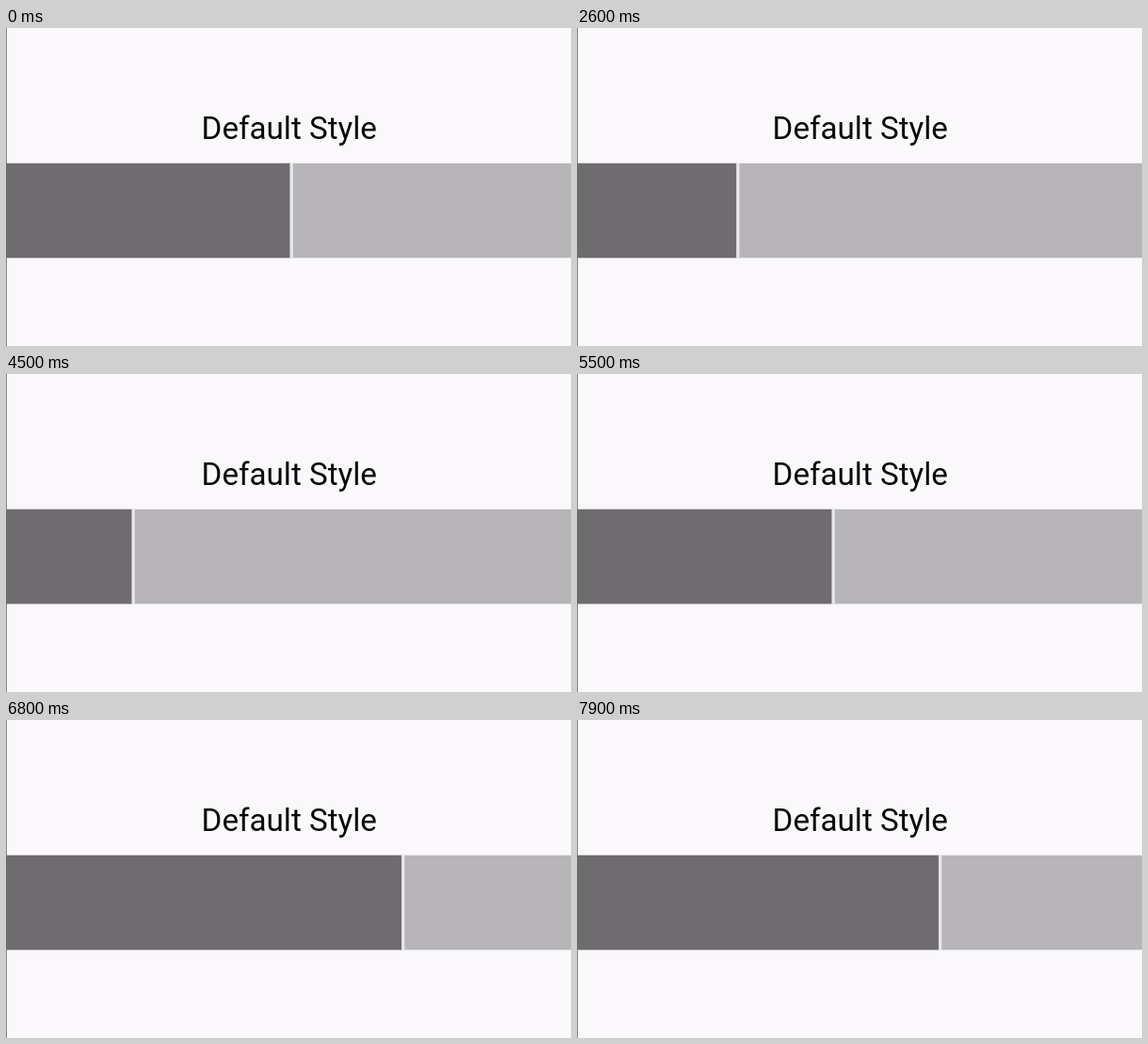
An HTML page for the animation above (8000 ms loop, 600x338 px).

```html
<!DOCTYPE html>
<html lang="en">
<head>
<meta charset="utf-8">
<title>Default Style</title>
<style>
  html, body { margin: 0; width: 100%; height: 100%; overflow: hidden; background: #faf8fb; }
  svg { display: block; width: 100vw; height: 100vh; }
  text { font: 33.2px Roboto, sans-serif; fill: #0a090b; }
  .bar { filter: blur(0.4px); }
</style>
</head>
<body>
<svg viewBox="0 0 600 338">
  <text x="300.8" y="118.2" text-anchor="middle">Default Style</text>
  <rect width="1" height="338" fill="#858386"/>
  <g class="bar">
    <rect x="-10" y="143.8" width="620" height="100.5" fill="#b7b5b8"/>
    <rect id="pane" x="-10" y="143.8" height="100.5" fill="#6e6c6f"/>
    <rect id="divider" y="143.8" width="3.2" height="100.5" fill="#e8e6e9"/>
  </g>
</svg>
<script>
  const LOOP = 8000, STEP = 100;

  // Key points of the drag: [ms, x of the divider]
  const drag = [
    [0, 302], [800, 302], [1700, 262.5], [2600, 169.7], [3800, 66.5], [3900, 66.5],
    [4500, 134], [5500, 271], [6600, 408.8], [6800, 420.5], [7400, 486], [7900, 384.5]
  ];

  const rise = i => (drag[i + 1][1] - drag[i][1]) / (drag[i + 1][0] - drag[i][0]);

  // Harmonic mean of the neighbouring rises: smooth, without overshoot
  function slope(i) {
    const a = rise(Math.max(0, i - 1)), b = rise(Math.min(i, drag.length - 2));
    return a * b > 0 ? 2 * a * b / (a + b) : 0;
  }

  function position(t) {
    const i = Math.max(0, drag.findIndex(p => p[0] >= t) - 1);
    const [t0, x0] = drag[i], [t1, x1] = drag[i + 1];
    const d = t1 - t0, u = (t - t0) / d, v = 1 - u;
    return v * v * (1 + 2 * u) * x0 + u * u * (1 + 2 * v) * x1
      + d * u * v * (v * slope(i) - u * slope(i + 1));
  }

  const pane = document.getElementById('pane');
  const divider = document.getElementById('divider');

  function draw() {
    const t = Math.floor(performance.now() % LOOP / STEP) * STEP;
    const x = position(t) - 0.4;
    pane.setAttribute('width', x + 10);
    divider.setAttribute('x', x);
    requestAnimationFrame(draw);
  }
  draw();
</script>
</body>
</html>
```
